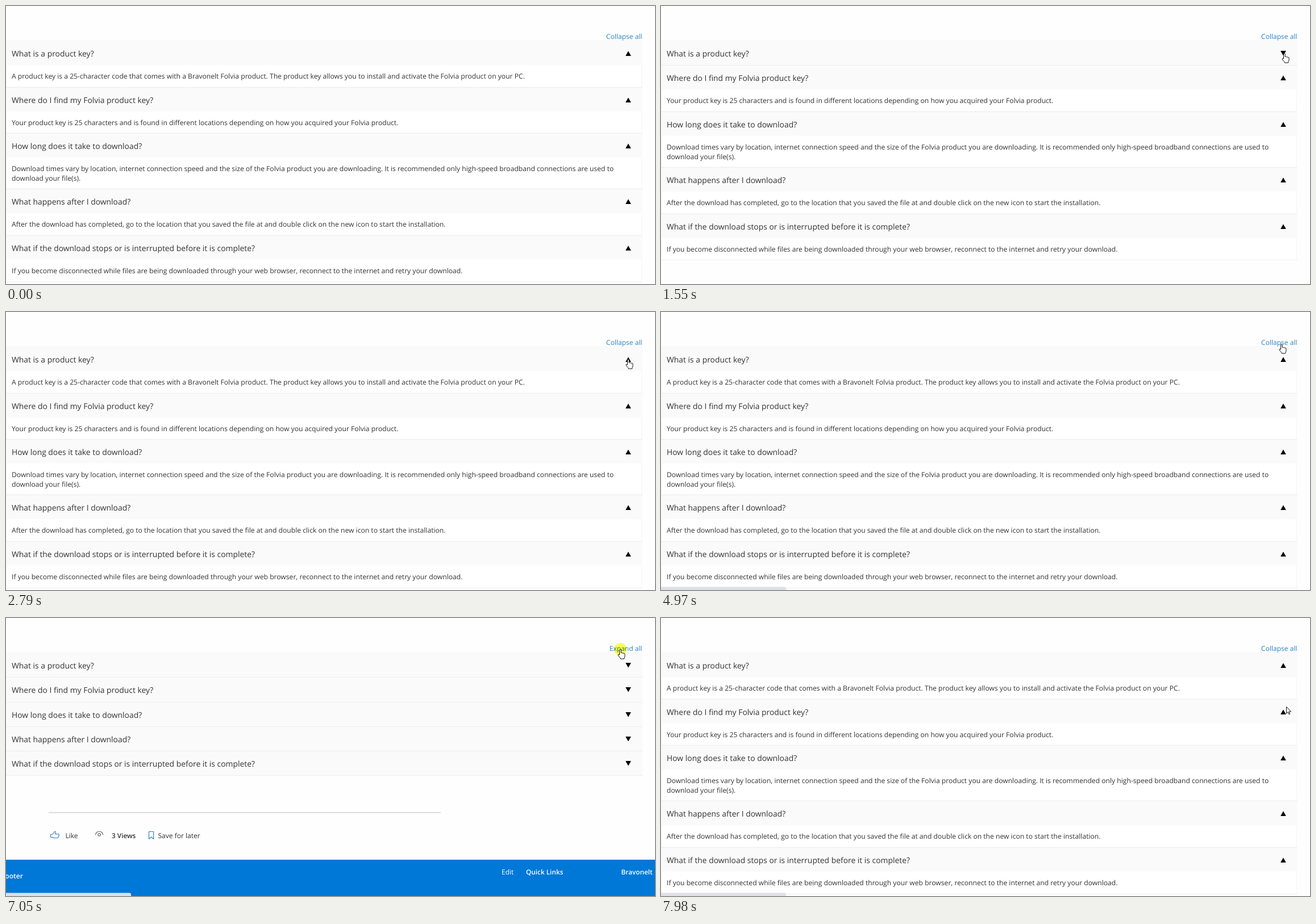
An HTML page for the animation above (8 s loop, 1142x490 px).

```html
<!DOCTYPE html>
<html lang="en">
<head>
<meta charset="utf-8">
<title>FAQ accordion</title>
<style>
  html, body { margin: 0; width: 100%; height: 100%; overflow: hidden; background: #fefefe; }
  svg { display: block; width: 1142px; height: 490px; }
  text { font: 12.04px "Open Sans", "Noto Sans", sans-serif; fill: #333; text-rendering: geometricPrecision; }
  .question { font-size: 13.88px; }
  .answer { font-size: 12.13px; }
  .toggle { fill: #2882c3; text-anchor: end; }
  .strong { font-weight: 600; font-size: 11.8px; }
  .footer text { fill: #fff; }
  .icon { fill: none; stroke: #2b7cc4; stroke-width: 1.1; stroke-linejoin: round; }
  .pointer { fill: #fff; stroke: #111; stroke-width: 1; stroke-linejoin: round; }
  #click { fill: #fffa58; mix-blend-mode: multiply; }
</style>
</head>
<body>
<svg viewBox="0 0 1142 490">
  <rect width="1142" height="490" fill="#fefefe"/>
  <g id="rows"></g>
  <g id="page-end">
    <path d="M75 343H765" stroke="#d0d0d0" stroke-width="1.5"/>
    <path class="icon" d="M78.5 381.5h3.2l4.2-5.2q2.2.2 1.4 2.4l-.6 2h5.3q1.5.3 1.1 1.8l-1.2 4.3q-.3 1-1.4 1h-5.6l-2.6-1.3h-3.8z"/>
    <g class="icon" style="stroke:#555">
      <path d="M157.3 382.3q1.4-6 6.8-6t6.8 6"/>
      <circle cx="164.1" cy="382" r="2.2"/>
    </g>
    <path class="icon" d="M251.5 376.5h8v13l-4-3.6-4 3.6z"/>
    <text x="104.5" y="387.5">Like</text>
    <text class="strong" x="186" y="387.5">3 Views</text>
    <text x="267.5" y="387.5">Save for later</text>
    <g class="footer">
      <rect y="426" width="1142" height="64" fill="#0078d7"/>
      <text class="strong" x="30" y="459" text-anchor="end" style="font-size:12.1px">Footer</text>
      <text x="872" y="452">Edit</text>
      <text class="strong" x="915" y="452">Quick Links</text>
      <text class="strong" x="1082.5" y="452">Bravonelt</text>
    </g>
  </g>
  <text id="toggle" class="toggle" x="1119.5" y="58"></text>
  <path id="status" d="M0 484.5H217q3 0 3 3v2.5H0z" fill="#dfdfe7"/>
  <circle id="click" r="11"/>
  <path id="hand" class="pointer" d="M-1.4 10.2V1.8a1.3 1.3 0 0 1 2.6 0V6.6q1.3-1 2.4.3 1.4-.9 2.3.5 1.9-.6 2.1 1.2V12q0 2-1.2 3.3V17H.2V15.8Q-2 13.6-3.7 11q-.6-1.6.8-1.8.8 0 1.5 1z"/>
  <path id="arrow" class="pointer" d="M.5.5V12.2l2.8-2.6 1.8 4.2 1.7-.7-1.8-4.1h3.6z"/>
</svg>
<script>
const LOOP = 8000;
const HEAD = 43.25, LINE = 16.5, PADDING = 21.9;

const faq = [
  ["What is a product key?",
    "A product key is a 25-character code that comes with a Bravonelt Folvia product. The product key allows you to install and activate the Folvia product on your PC."],
  ["Where do I find my Folvia product key?",
    "Your product key is 25 characters and is found in different locations depending on how you acquired your Folvia product."],
  ["How long does it take to download?",
    "Download times vary by location, internet connection speed and the size of the Folvia product you are downloading. It is recommended only high-speed broadband connections are used to",
    "download your file(s)."],
  ["What happens after I download?",
    "After the download has completed, go to the location that you saved the file at and double click on the new icon to start the installation."],
  ["What if the download stops or is interrupted before it is complete?",
    "If you become disconnected while files are being downloaded through your web browser, reconnect to the internet and retry your download."]
];

// Pointer keys: [start, kind, x, y]
const pointerKeys = [
  [0, "none", 0, 0],
  [70, "arrow", 1054, 361], [150, "arrow", 1057, 290], [230, "arrow", 1060, 221],
  [450, "arrow", 1087, 150],
  [860, "hand", 1088, 86], [1000, "hand", 1092, 85], [1070, "hand", 1095, 84],
  [1400, "hand", 1097, 83], [1790, "hand", 1095, 83],
  [4190, "hand", 1095, 81], [4410, "hand", 1091, 60], [4590, "hand", 1092, 56],
  [5740, "hand", 1091, 55], [5970, "hand", 1087, 55], [6050, "hand", 1083, 55],
  [6200, "hand", 1081, 55],
  [7830, "hand", 1085, 72], [7900, "arrow", 1093, 113], [7980, "arrow", 1100, 156]
];
const clicks = [[1400, 1550], [2560, 2790], [4900, 4970], [7050, 7200]];

const byId = id => document.getElementById(id);
const within = (t, [from, to]) => t >= from && t < to;
const show = (node, on) => node.setAttribute("display", on ? "inline" : "none");
const moveTo = (node, x, y) => node.setAttribute("transform", `translate(${x} ${y})`);

function add(parent, tag, attrs, text = "") {
  const node = document.createElementNS("http://www.w3.org/2000/svg", tag);
  for (const key in attrs) node.setAttribute(key, attrs[key]);
  node.textContent = text;
  return parent.appendChild(node);
}

const rows = faq.map(([question, ...lines], i) => {
  const group = add(byId("rows"), "g", {});
  const height = PADDING + LINE * lines.length;
  add(group, "rect", { x: 0, width: 1120, height: 44, fill: "#fafafa" });
  if (i) add(group, "rect", { x: 0, y: 1, width: 1120, height: 1, fill: "#eeeeee" });
  add(group, "text", { class: "question", x: 10, y: 29 }, question);
  const triangle = add(group, "path", {});
  const answer = add(group, "g", {});
  add(answer, "rect", { x: 0, y: 44, width: 1119, height: height - 1, fill: "#fff" });
  add(answer, "path", { d: `M.5 44v${height}M1118.5 44v${height}`, stroke: "#f5f5f5" });
  lines.forEach((line, n) => add(answer, "text", { class: "answer", x: 10, y: 68.3 + 17 * n }, line));
  return { group, triangle, answer, height };
});
const lastBorder = add(byId("rows"), "rect", { width: 1120, height: 1, fill: "#eeeeee" });

function render(t) {
  const allClosed = within(t, [5740, 7200]);
  const firstClosed = allClosed || within(t, [1475, 2710]);

  let top = 60;
  rows.forEach((row, i) => {
    const open = !(i ? allClosed : firstClosed);
    moveTo(row.group, 0, Math.round(top));
    row.triangle.setAttribute("d", open ? "M1095 19.5l4.8 8.5h-9.6z" : "M1095 27.5l4.8-8.5h-9.6z");
    show(row.answer, open);
    top += HEAD + (open ? row.height : 0);
  });
  lastBorder.setAttribute("y", Math.round(top) + 1);

  byId("toggle").textContent = allClosed ? "Expand all" : "Collapse all";
  show(byId("page-end"), allClosed);
  show(byId("status"), t >= 4590);

  const [, kind, x, y] = pointerKeys.findLast(key => key[0] <= t);
  for (const id of ["hand", "arrow", "click"]) moveTo(byId(id), x, y);
  show(byId("hand"), kind === "hand");
  show(byId("arrow"), kind === "arrow");
  show(byId("click"), clicks.some(span => within(t, span)));
}

const start = performance.now();
function tick() {
  render((performance.now() - start) % LOOP);
  requestAnimationFrame(tick);
}
render(0);
requestAnimationFrame(tick);
</script>
</body>
</html>
```
